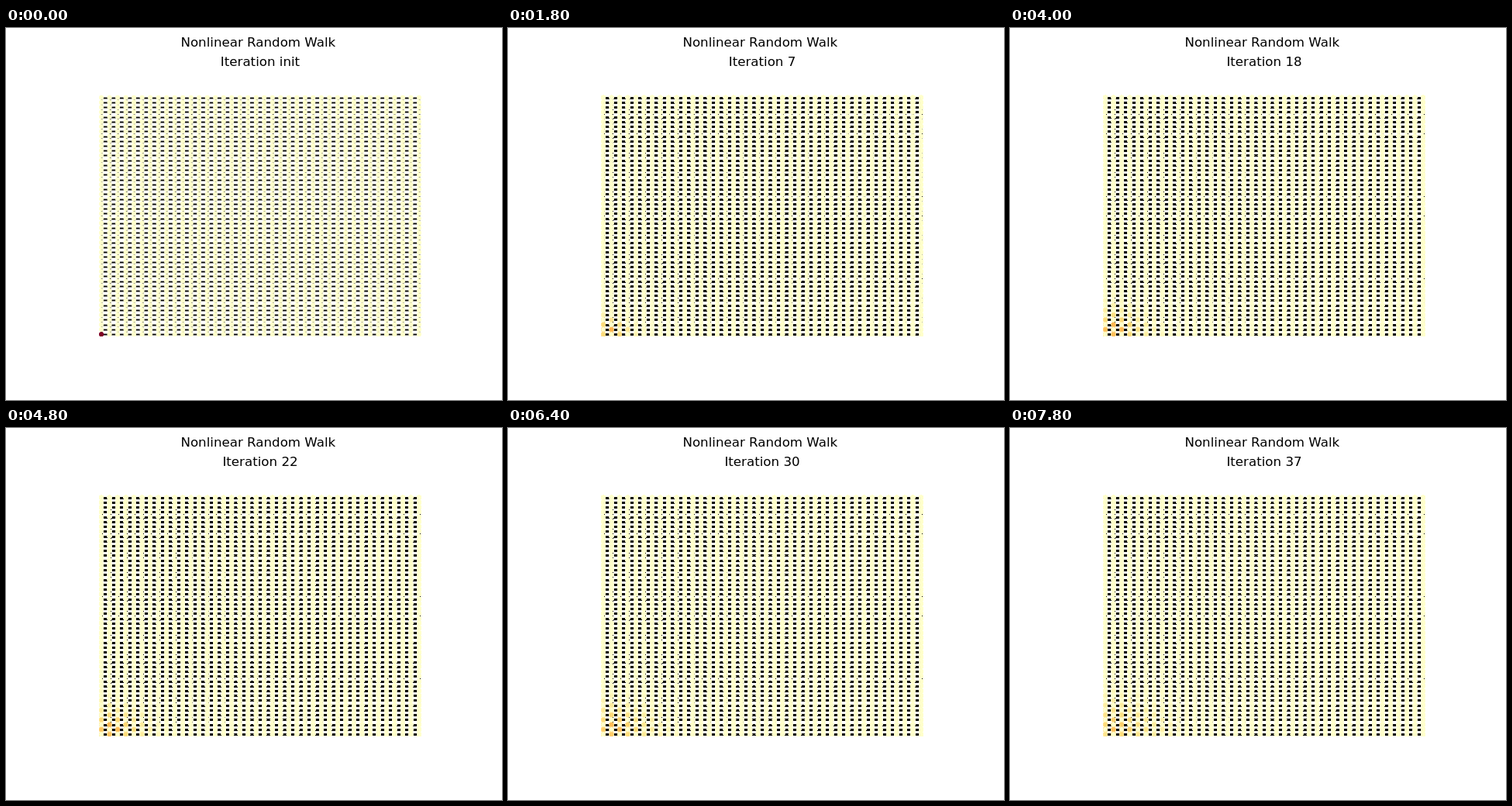
An HTML page with a canvas that plays this animation: 640 px wide and 480 px high, repeating every 8000 ms.

```html
<!DOCTYPE html>
<html lang="en">
<head>
<meta charset="utf-8">
<title>Nonlinear Random Walk</title>
<style>
  html, body { margin: 0; width: 100%; height: 100%; overflow: hidden; background: #fff; }
  canvas { display: block; }
</style>
</head>
<body>
<canvas id="stage" width="640" height="480"></canvas>
<script>
const W = 640, H = 480, LOOP = 8000, STEP = 200;
const COLS = 40, ROWS = 50;
const AXES = { cx: 328, cy: 242.4, w: 496 / 1.21, h: 369.6 / 1.21 };
const RADIUS = 2.89, LINE = 100 / 72;
const FONT_SIZE = 12 * 100 / 72;
const PALETTE = ['ffffcc', 'ffeda0', 'fed976', 'feb24c', 'fd8d3c', 'fc4e2a', 'e31a1c', 'bd0026', '800026']
  .map(hex => [0, 2, 4].map(i => parseInt(hex.slice(i, i + 2), 16)));

const layer = () => {
  const c = document.createElement('canvas');
  c.width = W;
  c.height = H;
  return c.getContext('2d');
};
const stage = document.getElementById('stage').getContext('2d');
const edges = layer(), nodes = layer();

const nodeX = c => AXES.cx - AXES.w / 2 + c * AXES.w / (COLS - 1);
const nodeY = r => AXES.cy + AXES.h / 2 - r * AXES.h / (ROWS - 1);
const snap = v => Math.floor(v + 0.5) + 0.5;

function makeGrid() {
  const path = new Path2D();
  const left = nodeX(0), top = nodeY(ROWS - 1);
  for (let r = 0; r < ROWS; r++) path.rect(left, snap(nodeY(r)) - LINE / 2, AXES.w, LINE);
  for (let c = 0; c < COLS; c++) path.rect(snap(nodeX(c)) - LINE / 2, top, LINE, AXES.h);
  return path;
}

function neighbours(i) {
  const c = i % COLS, r = Math.floor(i / COLS), list = [];
  if (c > 0) list.push(i - 1);
  if (c < COLS - 1) list.push(i + 1);
  if (r > 0) list.push(i - COLS);
  if (r < ROWS - 1) list.push(i + COLS);
  return list;
}

const grid = makeGrid();
const links = Array.from({ length: COLS * ROWS }, (_, i) => neighbours(i));

function walk(p) {
  const next = new Float64Array(p.length);
  p.forEach((v, i) => {
    if (v) for (const j of links[i]) next[j] += v / links[i].length;
  });
  return next;
}

function peak(step) {
  if (step === 0) return 1;
  return step === 1 ? 0.5 : 0.39 - 0.0015 * step;
}

function colour(v) {
  const x = Math.round(v * 255) / 255 * (PALETTE.length - 1);
  const i = Math.min(Math.floor(x), PALETTE.length - 2);
  const mix = PALETTE[i].map((a, k) => Math.round(a + (PALETTE[i + 1][k] - a) * (x - i)));
  return `rgb(${mix})`;
}

// Every pass is painted over the earlier ones, so soft edges build up.
function paint(p, step) {
  edges.fillStyle = '#000';
  edges.fill(grid);

  const scale = peak(step) / Math.max(...p);
  const groups = new Map();
  p.forEach((v, i) => {
    const key = colour(v * scale);
    if (!groups.has(key)) groups.set(key, new Path2D());
    const path = groups.get(key);
    const x = nodeX(i % COLS), y = nodeY(Math.floor(i / COLS));
    path.moveTo(x + RADIUS, y);
    path.arc(x, y, RADIUS, 0, 2 * Math.PI);
  });
  for (const [fill, path] of groups) {
    nodes.fillStyle = fill;
    nodes.fill(path);
  }
}

let shown = -1, state;

function reset() {
  edges.clearRect(0, 0, W, H);
  nodes.clearRect(0, 0, W, H);
  state = new Float64Array(COLS * ROWS);
  state[0] = 1;
  paint(state, 0);
  shown = -1;
}

function advance() {
  shown++;
  if (shown > 1) state = walk(state);
  paint(state, Math.max(0, shown - 1));
}

function compose() {
  stage.fillStyle = '#fff';
  stage.fillRect(0, 0, W, H);
  stage.drawImage(edges.canvas, 0, 0);
  stage.drawImage(nodes.canvas, 0, 0);
  stage.fillStyle = '#000';
  stage.font = `${FONT_SIZE}px "DejaVu Sans", sans-serif`;
  stage.textAlign = 'center';
  stage.fillText('Nonlinear Random Walk', AXES.cx - 2.65, 24);
  stage.fillText(`Iteration ${shown < 2 ? 'init' : shown - 2}`, AXES.cx, 49);
}

function tick() {
  const target = Math.floor(performance.now() % LOOP / STEP);
  if (target !== shown) {
    if (shown < 0 || target < shown) reset();
    while (shown < target) advance();
    compose();
  }
  requestAnimationFrame(tick);
}

tick();
</script>
</body>
</html>
```
